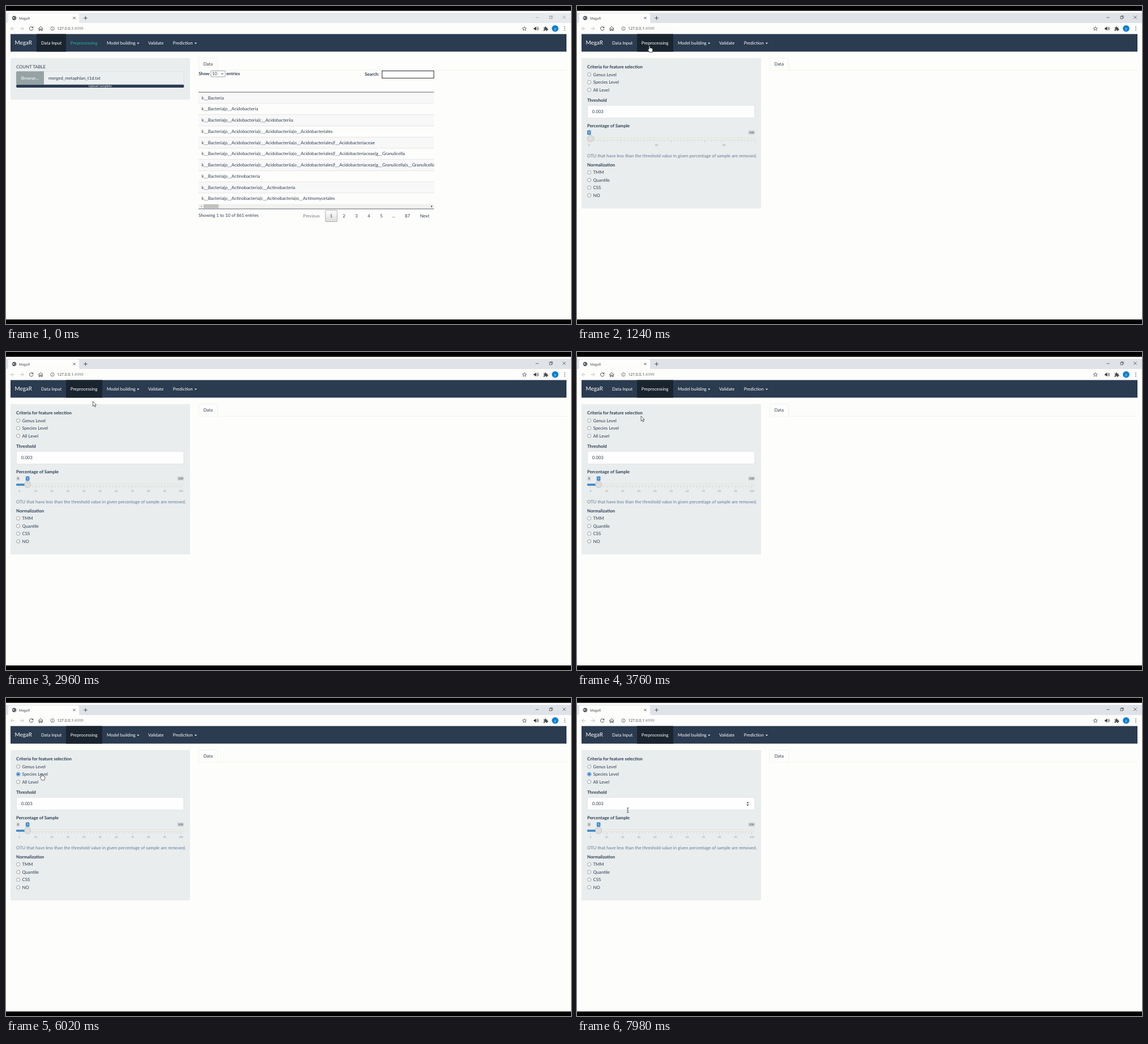
An HTML page that plays this animation: 998 px wide and 561 px high, repeating every 8 s.

```html
<!DOCTYPE html>
<html lang="en">
<head>
<meta charset="utf-8">
<title>MegaR</title>
<style>
  html, body { margin: 0; width: 100%; height: 100%; overflow: hidden; background: #fdfdfb; }
  svg { display: block; width: 100%; height: 100%; }
  text { font-family: Lato, sans-serif; font-size: 7.8px; fill: #2c3e50; white-space: pre; text-rendering: geometricPrecision; }
  .b { font-weight: 700; }
  .mid { text-anchor: middle; }
  .w { fill: #fff; }
  .ui { font-family: "Open Sans", sans-serif; font-size: 6.85px; fill: #3c4043; }
  .tiny { font-size: 4.7px; }
  .grey { fill: #999; }
  .icon { fill: none; stroke: #4a4d51; stroke-width: 1; }
</style>
</head>
<body>
<svg id="stage" viewBox="0 0 998 561" preserveAspectRatio="none"></svg>
<script>
const rect = (x, y, w, h, fill, more = '') => `<rect x="${x}" y="${y}" width="${w}" height="${h}" fill="${fill}" ${more}/>`;
const circle = (x, y, r, fill, more = '') => `<circle cx="${x}" cy="${y}" r="${r}" fill="${fill}" ${more}/>`;
const path = (d, more = 'class="icon"') => `<path d="${d}" ${more}/>`;
// Text is placed by its optical middle line.
const text = (x, y, s, cls = '', more = '') => `<text x="${x}" y="${y + 2.7}" class="${cls}" ${more}>${s}</text>`;
const group = (id, body, more = '') => `<g id="${id}" ${more}>${body}</g>`;
const range = (n, f) => Array.from({ length: n }, (_, i) => f(i)).join('');

function browser() {
  return rect(0, 0, 998, 8.5, '#000') + rect(0, 553, 998, 8, '#000') +
    rect(0, 12, 998, 18, '#e7eaed', 'id="strip"') +
    path('M2 30Q4 30 4 27V16Q4 13 7 13H126Q129 13 129 16V27Q129 30 131 30Z', 'fill="#fdfdfc"') +
    circle(14.5, 21.2, 3.7, '#4d5256') +
    path('M12 19.5L14.5 20.2 14 22 12.3 22.3ZM15.5 18.5L17 20 16 20.4ZM15.6 22L17 22.4 15.2 24Z', 'fill="#f4f5f5"') +
    text(23, 20.9, 'MegaR', 'ui', 'style="font-size:6px"') +
    path('M118.5 19.2l4 4m0-4l-4 4M137.2 21.2h6.6m-3.3-3.3v6.6') +
    group('controls', path('M935.5 20.3h5.4M960 18.5h4v4h-4ZM961.2 18.5v-1.2h4v4h-1.2M983.3 17.2l5.4 5.4m0-5.4l-5.4 5.4', 'class="icon" style="stroke-width:.8"')) +
    path('M15 39.8H8.7m3-3l-3 3 3 3M24.8 39.8h6.3m-3-3l3 3-3 3', 'class="icon" style="stroke:#bcbec1"') +
    path('M47.2 37.8A3.2 3.2 0 1 0 47.8 40.7M47.9 36.2v2.4h-2.5') +
    path('M57.2 40l4.1-3.7 4.1 3.7M58.5 39.3v4h1.8v-2.6h2v2.6h1.8v-4') +
    circle(82, 39.8, 3.2, 'none', 'stroke="#5f6368" stroke-width=".8"') + path('M82 39.4v2.2m0-3.8v.8', 'class="icon" style="stroke-width:.8"') +
    text(90.3, 39.7, '127.0.0.1<tspan fill="#777b80">:4999</tspan>', 'ui') +
    path('M915.7 36.4l1 2.3 2.6.2-2 1.7.7 2.5-2.3-1.4-2.3 1.4.7-2.5-2-1.7 2.6-.2Z', 'class="icon" style="stroke-width:.8"') +
    path('M932.3 38.4h1.7l2.5-2.3v7.4l-2.5-2.3h-1.7Z', 'fill="#333"') + path('M937.9 38q1.5 1.8 0 3.6M939.2 36.5q2.8 3.3 0 6.6') +
    path('M949.5 38h2.2q-.4-2 1.1-2t1.1 2h2.3v2.2q1.6-.3 1.6 1t-1.6 1v1.6h-2.3q.2-1.5-1.1-1.5t-1.1 1.5h-2.2v-2.2q1.5.1 1.5-1.2t-1.5-1.1Z', 'fill="#4a4d51"') +
    circle(970, 39.7, 5.8, '#0b7fd0') + text(970, 39.2, 'y', 'ui mid', 'style="fill:#fff;font-size:6px"') +
    [36.8, 39.8, 42.8].map(y => circle(987, y, .8, '#4a4d51')).join('');
}

function navbar() {
  const caret = x => path(`M${x} 64.8h4.2l-2.1 2.2Z`, 'fill="#fff"');
  return rect(8, 49.5, 982, 31, '#2b3b50') + rect(54, 49.5, 52, 31, '#1a242f', 'id="active"') +
    text(15.5, 65.6, 'MegaR', 'w', 'style="font-size:9.9px"') +
    text(62, 65, 'Data Input', 'w') + text(113.8, 65, 'Preprocessing', '', 'id="preTab"') +
    text(178, 65, 'Model building', 'w') + caret(231.3) +
    text(251, 65, 'Validate', 'w') + text(294.8, 65, 'Prediction', 'w') + caret(333);
}

const dataTab = path('M340 113.3H990', 'stroke="#eeeeea" stroke-width=".8"') +
  path('M340.5 113.5V94q0-2 2-2h29q2 0 2 2v19.5', 'fill="#fdfdfb" stroke="#ecedeb" stroke-width=".8"') + text(348.8, 102.6, 'Data');

function inputPage() {
  const acido = ['k__Bacteria', 'p__Acidobacteria', 'c__Acidobacteriia', 'o__Acidobacteriales', 'f__Acidobacteriaceae', 'g__Granulicella', 's__Granulicella_mallensis'];
  const actino = ['k__Bacteria', 'p__Actinobacteria', 'c__Actinobacteria', 'o__Actinomycetales'];
  const lineage = i => (i < 7 ? acido.slice(0, i + 1) : actino.slice(0, i - 5)).join('|');
  const row = i => {
    const top = 152.2 + i * 19.75;
    return rect(340, top, 416, 19.75, i % 2 ? '#fdfdfb' : '#f8f8f9') +
      (i ? rect(340, top - .3, 416, .6, '#d8d9da') : '') + text(345.7, top + 9.8, lineage(i));
  };
  const pages = [['2', 597], ['3', 619], ['4', 641], ['5', 663], ['…', 684.5], ['87', 709]];
  return rect(8, 91.8, 317, 73.5, '#e9edee', 'rx="1.5"') + text(18, 107, 'COUNT TABLE') +
    rect(18, 115.5, 296, 23, '#eceff0', 'rx="2" stroke="#dde3e7" stroke-width=".8"') +
    path('M20 115.3h47v23.2H18V117.3q0-2 2-2Z', 'fill="#95a3a5"') + text(26.8, 127, 'Browse...', 'w') + text(75, 127.5, 'merged_metaphlan_t1d.txt') +
    rect(18, 138.7, 296.5, 5.3, '#2b3b50', 'rx="2"') + text(166.3, 140.7, 'Upload complete', 'w mid', 'style="font-size:5.5px"') +
    dataTab +
    text(340.3, 119.7, 'Show', 'b') + rect(361.8, 114.3, 25.4, 10.6, '#fff', 'rx="1" stroke="#777" stroke-width=".7"') +
    text(364, 119.7, '10') + path('M380 118.6l2 2 2-2', 'class="icon" style="stroke:#222"') + text(389.2, 119.7, 'entries', 'b') +
    text(633.8, 120.6, 'Search:', 'b') + rect(664.3, 114.5, 91.4, 12.8, '#fff', 'stroke="#3b3b42" stroke-width="1.1"') +
    `<clipPath id="tableClip"><rect x="340" y="150" width="416.3" height="210"/></clipPath>` +
    group('table', range(10, row), 'clip-path="url(#tableClip)"') +
    rect(340, 151.6, 416, .9, '#50545b') +
    rect(340, 349.3, 416, 8, '#f1f1f1') + rect(349, 349.8, 26.5, 7, '#c1c1c1') +
    path('M346 351.6v3.6l-2-1.8Z', 'fill="#a3a3a3"') + path('M751 351.4v4l2.2-2Z', 'fill="#444"') +
    rect(340, 357.5, 416, .9, '#50545b') +
    text(340.3, 369.7, 'Showing 1 to 10 of 861 entries') + text(524.8, 370, 'Previous', '', 'style="fill:#72777c"') +
    `<linearGradient id="button" x2="0" y2="1"><stop stop-color="#fff"/><stop offset="1" stop-color="#dcdcdc"/></linearGradient>` +
    rect(564.2, 360.4, 20.8, 20, 'url(#button)', 'rx="1" stroke="#979797" stroke-width=".7"') + text(574.6, 370, '1', 'mid') +
    pages.map(([s, x]) => text(x, 370, s, 'mid')).join('') + text(731.2, 370, 'Next');
}

const badge = (x, w, s, on) => rect(x, 219.3, w, 8, on ? '#428bca' : '#d9dce0', 'rx="1.5"') +
  text(x + w / 2, 222.5, s, 'mid', `style="font-size:5.2px;fill:${on ? '#fff' : '#333'}"`);

function slider(id, value, handleX, gridX, step, labelEvery) {
  const tick = i => rect(gridX + i * step / 5 - .25, 236.8, .5, i % 5 ? 2 : 4, '#b3b8bd');
  const labelX = i => labelEvery > 1 ? 21 + i * 29.85 : gridX + i * step;
  return group(id,
    range(51, tick) +
    range(11, i => i % labelEvery ? '' : text(labelX(i), 244, i * 10, 'tiny mid grey')) +
    rect(18, 232.6, 296, 3, '#f1f1ec', 'rx="1.5" stroke="#cfd0ca" stroke-width=".5"') +
    (value ? rect(18, 232.3, handleX - 18, 3.8, '#428bca', 'rx="1"') + badge(18, 6.3, 0) : '') +
    badge(value ? 34.8 : 18, 6.6, value, true) + badge(302.3, 12, 100) +
    circle(handleX, 233.8, 5.6, '#dedede', 'stroke="#ababab" stroke-width=".6"'));
}

function preprocessPage() {
  const radio = (y, label) => circle(21.6, y, 3.1, '#fff', 'stroke="#767676" stroke-width=".7"') + text(28.5, y, label);
  const radios = (y, labels) => labels.map((s, i) => radio(y + i * 13.5, s)).join('');
  return rect(8, 91.8, 317, 265.5, '#e9edee', 'rx="1.5"') + dataTab +
    text(18, 107, 'Criteria for feature selection', 'b') + radios(120.9, ['Genus Level', 'Species Level', 'All Level']) +
    group('checked', circle(21.6, 134.4, 3.1, '#fff', 'stroke="#0b6fd6" stroke-width=".8"') + circle(21.6, 134.4, 1.9, '#0b6fd6')) +
    text(18, 166.5, 'Threshold', 'b') + rect(18.3, 175.2, 295.6, 22.4, '#fefefe', 'rx="2" stroke="#dae0e5" stroke-width=".8"') + text(26.8, 186.7, '0.003') +
    group('spinner', path('M299.4 185.5l2.1-2.6 2.1 2.6ZM299.4 187.8l2.1 2.6 2.1-2.6Z', 'fill="#444"')) +
    text(18, 211.2, 'Percentage of Sample', 'b') +
    slider('sliderRaw', 0, 24, 18.3, 29.6, 4) + slider('sliderSet', 5, 38, 23.8, 28.5, 1) +
    text(18, 263.8, 'OTU that have less than the threshold value in given percentage of sample are removed.', '', 'style="fill:#627b95"') +
    text(18, 280, 'Normalization', 'b') + radios(293.5, ['TMM', 'Quantile', 'CSS', 'NO']);
}

const cursors = group('arrow', path('M0 0V8.6L2 6.8 3.4 10 4.9 9.3 3.5 6.2H6.1Z', 'fill="#fff" stroke="#222" stroke-width=".7"')) +
  group('hand', path('M-.9 6.2V.6Q-.9-.2 0-.2T.9.6V3.6Q2 3 2.6 4 3.8 3.5 4.3 4.5 5.6 4.3 5.6 5.6V8Q5.6 9.4 4.8 10.2V11.2H-.2V10.2L-2.6 7Q-3.2 5.8-2.2 5.5-1.5 5.5-.9 6.2Z', 'fill="#fff" stroke="#222" stroke-width=".7"')) +
  group('ibeam', path('M-1.8-4.2Q0-4.2 0-3.4 0-4.2 1.8-4.2M0-3.4V3.4M-1.8 4.2Q0 4.2 0 3.4 0 4.2 1.8 4.2', 'class="icon" style="stroke:#222;stroke-width:.8"'));

document.getElementById('stage').innerHTML = browser() + navbar() +
  group('inputPage', inputPage()) + group('preprocessPage', preprocessPage()) + group('cursor', cursors);

const LOOP = 8000, FOCUS = 800, SWITCH = 1140, SLIDER = 1300, SELECT = 5400;
// time, x, y of the pointer's hot spot
const route = [
  [800, 128, 70.5], [1650, 128, 70.5], [2800, 153.5, 87], [3340, 153.5, 87], [4100, 84, 132],
  [4800, 84, 132], [5250, 63, 133.7], [6720, 63, 133.7], [7440, 87, 182], [7960, 89.7, 198]
];
const $ = id => document.getElementById(id);
const show = (id, on) => $(id).setAttribute('display', on ? 'inline' : 'none');

function pointerAt(t) {
  const next = route.findIndex(p => p[0] > t);
  if (next < 1) return (next ? route.at(-1) : route[0]).slice(1);
  const [t0, x0, y0] = route[next - 1], [t1, x1, y1] = route[next];
  const u = (t - t0) / (t1 - t0), k = u * u * (3 - 2 * u);
  return [x0 + (x1 - x0) * k, y0 + (y1 - y0) * k];
}

function render(t) {
  const focused = t >= FOCUS, switched = t >= SWITCH;
  $('strip').setAttribute('fill', focused ? '#dfe2e7' : '#e7eaed');
  $('controls').setAttribute('opacity', focused ? 1 : .5);
  $('active').setAttribute('x', switched ? 106 : 54);
  $('active').setAttribute('width', switched ? 64 : 52);
  $('preTab').style.fill = switched ? '#fff' : '#23b49c';
  show('inputPage', !switched);
  show('preprocessPage', switched);
  show('sliderRaw', t < SLIDER);
  show('sliderSet', t >= SLIDER);
  show('checked', t >= SELECT);

  const [x, y] = pointerAt(t);
  const overField = y > 175 && y < 200;
  const overLink = y < 80.5 || (x < 74 && y > 128 && y < 140);
  $('cursor').setAttribute('transform', `translate(${x} ${y})`);
  show('cursor', focused);
  show('ibeam', overField);
  show('hand', overLink);
  show('arrow', !overField && !overLink);
  show('spinner', overField);
}

function tick() {
  render(performance.now() % LOOP);
  requestAnimationFrame(tick);
}
tick();
</script>
</body>
</html>
```
